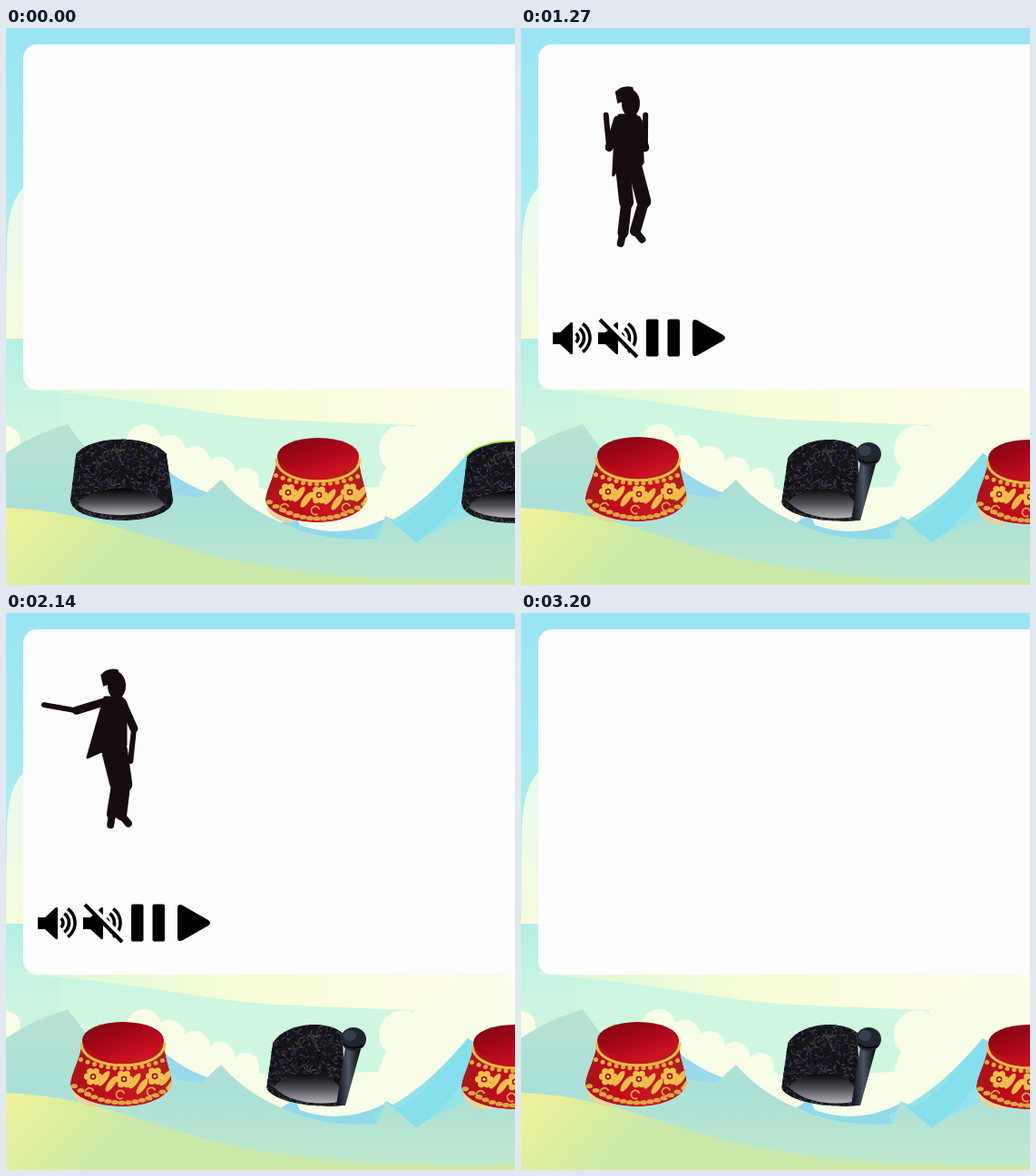
These frames come from a looping animation (561x613 px, 3270 ms). An HTML page with a canvas:

```html
<!DOCTYPE html>
<html lang="en">
<head>
<meta charset="utf-8">
<title>Hat drop</title>
<style>
html, body { margin: 0; width: 100%; height: 100%; overflow: hidden; background: #a5e9f6; }
canvas { display: block; width: 561px; height: 613px; }
</style>
</head>
<body>
<canvas id="stage" width="561" height="613"></canvas>
<script>
const W = 561, H = 613, LOOP = 3270, STEPS = 49;
const DRAG = 2, DROP = 18, CLEAR = 46;
const ctx = document.getElementById('stage').getContext('2d');

function layer(w, h, paint) {
  const c = document.createElement('canvas');
  c.width = w;
  c.height = h;
  paint(c.getContext('2d'));
  return c;
}

function rng(seed) {
  return () => (seed = (seed * 16807) % 2147483647) / 2147483647;
}

function fade(g, x0, y0, x1, y1, ...colors) {
  const f = g.createLinearGradient(x0, y0, x1, y1);
  colors.forEach((c, i) => f.addColorStop(i / (colors.length - 1), c));
  return f;
}

function shape(g, d, fill) {
  g.fillStyle = fill;
  g.fill(new Path2D(d));
}

function line(g, d, color, width) {
  g.strokeStyle = color;
  g.lineWidth = width;
  g.stroke(new Path2D(d));
}

function arc(g, x, y, r, from, to) {
  g.beginPath();
  g.arc(x, y, r, from, to);
  g.stroke();
}

function oval(g, x, y, rx, ry, fill, turn = 0) {
  g.fillStyle = fill;
  g.beginPath();
  g.ellipse(x, y, rx, ry, turn, 0, Math.PI * 2);
  g.fill();
}

const scenery = layer(W, H, g => {
  g.fillStyle = fade(g, 0, 0, 0, 440, '#9ae4f6', '#a4eaf3', '#b6efe8', '#cff7df');
  g.fillRect(0, 0, W, H);
  shape(g, 'M1 235 Q3 185 24 172 V342 H0Z', fade(g, 0, 170, 0, 342, '#e8faf0', '#f4fcdc'));
  shape(g, 'M0 342 H60 V470 H0Z', fade(g, 0, 342, 0, 470, '#b5efe6', '#d2f6dc'));
  shape(g, 'M20 398 C150 406 210 426 300 431 Q390 435 450 437 L561 425 V395 H20Z',
    fade(g, 20, 0, 520, 0, '#d9f7d8', '#f8fdd8', '#fefde8'));

  const cloud = '#f8fde8';
  oval(g, 0, 454, 16, 16, cloud);
  for (let i = 0; i < 5; i++) oval(g, 152 + i * 28, 455 + i * 11, 19 - i, 19 - i, cloud);
  for (let i = 0; i < 3; i++) oval(g, 438 + i * 43, 464 - i * 18, 27 + i * 5, 27 + i * 5, cloud);
  shape(g, 'M130 462 L220 480 L290 510 L410 505 L424 470 L561 430 V570 H130Z', cloud);

  shape(g, 'M170 480 Q195 503 228 513 L195 530 H160Z', '#98d9ec');
  shape(g, 'M295 550 L318 535 L324 547 Q370 564 418 540 L440 570 H295Z', '#8fd9ea');
  shape(g, 'M405 552 C455 530 485 495 509 468 L561 500 V590 H420Z',
    fade(g, 0, 470, 0, 580, '#88dfee', '#9ce4e6'));
  shape(g, 'M0 468 Q30 447 68 436 L88 463 Q140 512 215 517 L237 497 Q265 530 310 547 Q350 566 410 562 L418 537 L452 566 Q490 540 561 520 V613 H0Z',
    fade(g, 0, 440, 0, 613, '#b6e3d2', '#aae0d8', '#c0eacb'));
  shape(g, 'M418 537 L452 566 Q485 548 512 500 L509 468 C485 502 462 528 433 544Z', '#84deec');
  shape(g, 'M0 528 C105 532 170 571 260 588 C350 606 440 609 561 607 V613 H0Z',
    fade(g, 0, 530, 90, 613, '#f0f09c', '#dcee9c', '#cbeaa9'));
});

const BODY = 'M6 17 C22 -5 90 -5 106 17 L113 66 C116 98 -3 98 0 66Z';
const TOP = 'M6 17 C22 -5 90 -5 106 17';

function wool(g, d) {
  const rand = rng(71);
  const p = new Path2D(d);
  const tints = ['#4a4c6a', '#56502f', '#3a3d50', '#07070b', '#3e3058'];
  g.save();
  g.clip(p);
  g.fillStyle = '#15151a';
  g.fill(p);
  g.lineWidth = 1;
  for (let i = 0; i < 520; i++) {
    g.strokeStyle = tints[i % tints.length];
    const a = rand() * 6.3;
    arc(g, rand() * 114, rand() * 92, 1.5 + rand() * 3, a, a + 1.8);
  }
  g.restore();
}

const blackHat = layer(114, 94, g => {
  wool(g, BODY);
  shape(g, 'M8 72 C26 49 86 49 104 72 C90 88 22 88 8 72Z',
    fade(g, 0, 56, 0, 85, '#08080a', '#4d4c52', '#bfbec3'));
});

const micHat = layer(114, 94, g => {
  wool(g, 'M7 20 C22 -4 68 -5 84 9 L87 89 C52 93 3 84 0 69Z');
  shape(g, 'M8 68 C25 48 74 50 84 74 L80 85 C48 90 19 82 8 68Z',
    fade(g, 0, 54, 0, 87, '#09090b', '#515056', '#b4b3b9'));
  shape(g, 'M87 24 L104 27 L87 89 H77Z', fade(g, 79, 0, 102, 0, '#111620', '#4d5664', '#10131a'));
  oval(g, 96, 16, 14, 13, '#202630');
  oval(g, 92, 12, 7, 6, '#37404e');
  line(g, 'M85 21 Q94 29 107 23', '#080a0e', 2);
});

function flower(g, x, y, r) {
  for (let a = 0; a < 6; a++) {
    oval(g, x + Math.cos(a * Math.PI / 3) * r, y + Math.sin(a * Math.PI / 3) * r, r * .55, r * .55, '#f3c14b');
  }
  oval(g, x, y, r * .5, r * .5, '#a80f18');
  oval(g, x, y, r * .25, r * .25, '#ffe08a');
}

const redHat = layer(116, 98, g => {
  shape(g, 'M4 74 Q14 87 34 93 Q20 98 5 85 Q-1 79 4 74Z', '#ead49a');
  const body = 'M13 22 C11 43 0 57 0 71 C5 87 34 94 58 94 C85 94 109 84 112 68 C110 53 104 41 103 22Z';
  const sag = x => 1 - ((x - 58) / 52) ** 2;
  g.save();
  g.clip(new Path2D(body));
  shape(g, body, fade(g, 0, 0, 112, 0, '#a8161a', '#c00c1a', '#c81620', '#a8201c'));
  for (let i = 0; i < 15; i++) {
    const x = 4 + i * 7.5;
    oval(g, x, 40 + sag(x) * 12, 2.5, 2.5, '#e8ad3b');
    oval(g, x, 73 + sag(x) * 17, 4, 2.5, '#e2a444');
  }
  g.strokeStyle = '#e3a64b';
  g.lineWidth = 1.8;
  for (let x = 25; x < 100; x += 34) {
    const y = 57 + sag(x) * 7;
    flower(g, x, y, 6.5);
    for (const s of [-1, 1]) oval(g, x + 16 + s * 4, y + 5 + s * 3, 10, 3.6, '#efbd4b', -.95);
    arc(g, x - 4, y + 17, 4.5, 1, 6);
  }
  g.restore();
  line(g, 'M12 24 C12 57 104 57 104 24', '#edbd45', 3);
  oval(g, 58, 21, 45, 20, fade(g, 50, 1, 64, 41, '#8b0714', '#aa0819', '#cb1020'));
});

function mix(a, b, k) {
  if (typeof a === 'number') return a + (b - a) * k;
  return a.map((v, i) => mix(v, b[i], k));
}

function pose(keys, n) {
  let i = 0;
  while (i < keys.length - 2 && n >= keys[i + 1][0]) i++;
  const [t0, a] = keys[i], [t1, b] = keys[i + 1];
  const u = Math.max(0, Math.min(1, (n - t0) / (t1 - t0)));
  return mix(a, b, u * u * (3 - 2 * u));
}

// neck, turn to profile, coat hem, then limb angles in degrees from straight down
const spread = [[112, 104], 0, [-30, 42], [-61, -84], [81, 88], [0, 25, 4], [-13, -35, 25]];
const reach = [[118, 93], 1, [-28, 14], [-73, -100], [24, -6], [14, -9, -8], [8, -7, 40]];
const tuck = [[118, 95], 1, [-14, 14], [-12, -185], [8, 190], [7, -10, -15], [18, -14, 40]];
const dance = [[18, tuck], [23, spread], [32, reach], [38, tuck], [45, spread]];
const drag = [[DRAG, [71, 456]], [7, [115, 265]], [15, [102, 188]], [17, [100, 180]]];

const INK = '#170c12';

function limb(x, y, angles, lengths, widths) {
  angles.forEach((deg, i) => {
    const a = deg * Math.PI / 180;
    ctx.lineWidth = widths[i];
    ctx.beginPath();
    ctx.moveTo(x, y);
    x += Math.sin(a) * lengths[i];
    y += Math.cos(a) * lengths[i];
    ctx.lineTo(x, y);
    ctx.stroke();
  });
}

function dancer(n) {
  const [[x, y], turn, [back, front], armL, armR, legL, legR] = pose(dance, n);
  const hip = y + 58, wide = 18 - turn * 8;
  const arm = [32, 36], sleeve = [9, 6];
  const leg = [38, 34, 12], trouser = [16, 12, 8];
  ctx.save();
  ctx.strokeStyle = ctx.fillStyle = INK;
  ctx.lineJoin = ctx.lineCap = 'round';
  limb(x - wide, y + 5, armL, arm, sleeve);
  limb(x + wide, y + 5, armR, arm, sleeve);
  limb(x - 8 + turn * 3, hip, legL, leg, trouser);
  limb(x + 11 - turn * 3, hip, legR, leg, trouser);
  const coat = `M${x - 9} ${y} H${x + 9} L${x + wide + 4} ${y + 6} L${x + front} ${hip - 6} L${x + 12} ${hip}`
    + ` H${x - 10} L${x + back} ${hip + 8} L${x - wide - 2} ${y + 10}Z`;
  shape(ctx, coat, INK);
  line(ctx, coat, INK, 3);
  oval(ctx, x + turn * 4, y - 13, 10, 15, INK);
  ctx.translate(x - 2 - turn, y - 28 + turn * 4);
  ctx.rotate(-.3 * turn);
  shape(ctx, 'M-11 9 L-10 -4 Q0 -10 10 -4 L11 9Z', INK);
  ctx.restore();
}

function speaker(x) {
  shape(ctx, `M${x} 335 H${x + 8} L${x + 20} 324 Q${x + 22} 323 ${x + 22} 326 V357 Q${x + 22} 360 ${x + 20} 359 L${x + 8} 348 H${x}Z`, '#000');
  ctx.strokeStyle = '#000';
  ctx.lineWidth = 3.6;
  for (const r of [6, 12.5, 19]) arc(ctx, x + 22, 341, r, -.95, .95);
}

function controls() {
  speaker(35);
  speaker(85);
  line(ctx, 'M89 318 L132 361', '#fdfcff', 5);
  line(ctx, 'M87 321 L128 362', '#000', 4);
  ctx.fillStyle = '#000';
  for (const x of [138, 161.5]) {
    ctx.beginPath();
    ctx.roundRect(x, 320.5, 13.5, 41, 2);
    ctx.fill();
  }
  shape(ctx, 'M189 325 Q189 319 195 322 L223 338 Q227 341 223 344 L195 360 Q189 363 189 357Z', '#000');
}

function panel(dashed) {
  ctx.fillStyle = '#fdfcff';
  ctx.beginPath();
  ctx.roundRect(19, 18, 700, dashed ? 384 : 380, 15);
  ctx.fill();
  if (!dashed) return;
  ctx.save();
  ctx.setLineDash([6, 4]);
  line(ctx, 'M34 19 H561', '#000', 2);
  line(ctx, 'M30 19 Q20 20 20 33 V387 Q20 401 34 401 H230', '#000', 2);
  line(ctx, 'M234 401 H561', '#f7ed39', 2);
  ctx.restore();
}

function edge(x, y, color) {
  ctx.save();
  ctx.translate(x, y);
  line(ctx, TOP, color, 3);
  ctx.restore();
}

function draw(n) {
  const dashed = n >= DRAG && n < DROP;
  ctx.drawImage(scenery, 0, 0);
  panel(dashed);

  if (n < DROP) {
    const dy = dashed ? 4 : 0;
    ctx.drawImage(blackHat, 71, 452 + dy);
    ctx.drawImage(redHat, 286, 450 + dy);
    edge(502, 455 + dy, '#8fe62c');
    ctx.drawImage(blackHat, 502, 455 + dy);
  } else {
    ctx.drawImage(redHat, 71, 449);
    ctx.drawImage(micHat, 287, 453);
    ctx.drawImage(redHat, 502, 452);
  }

  if (dashed) {
    const [x, y] = pose(drag, n);
    edge(x, y, '#fbf03c');
    ctx.globalAlpha = .7;
    ctx.drawImage(blackHat, x, y);
    ctx.globalAlpha = 1;
  }
  if (n >= DROP && n < CLEAR) {
    dancer(n);
    controls();
  }
}

let shown = -1;
const start = performance.now();
function tick() {
  const t = (performance.now() - start) % LOOP;
  const n = Math.min(STEPS - 1, Math.floor(t * STEPS / LOOP + .07));
  if (n !== shown) draw(shown = n);
  requestAnimationFrame(tick);
}
tick();
</script>
</body>
</html>
```
